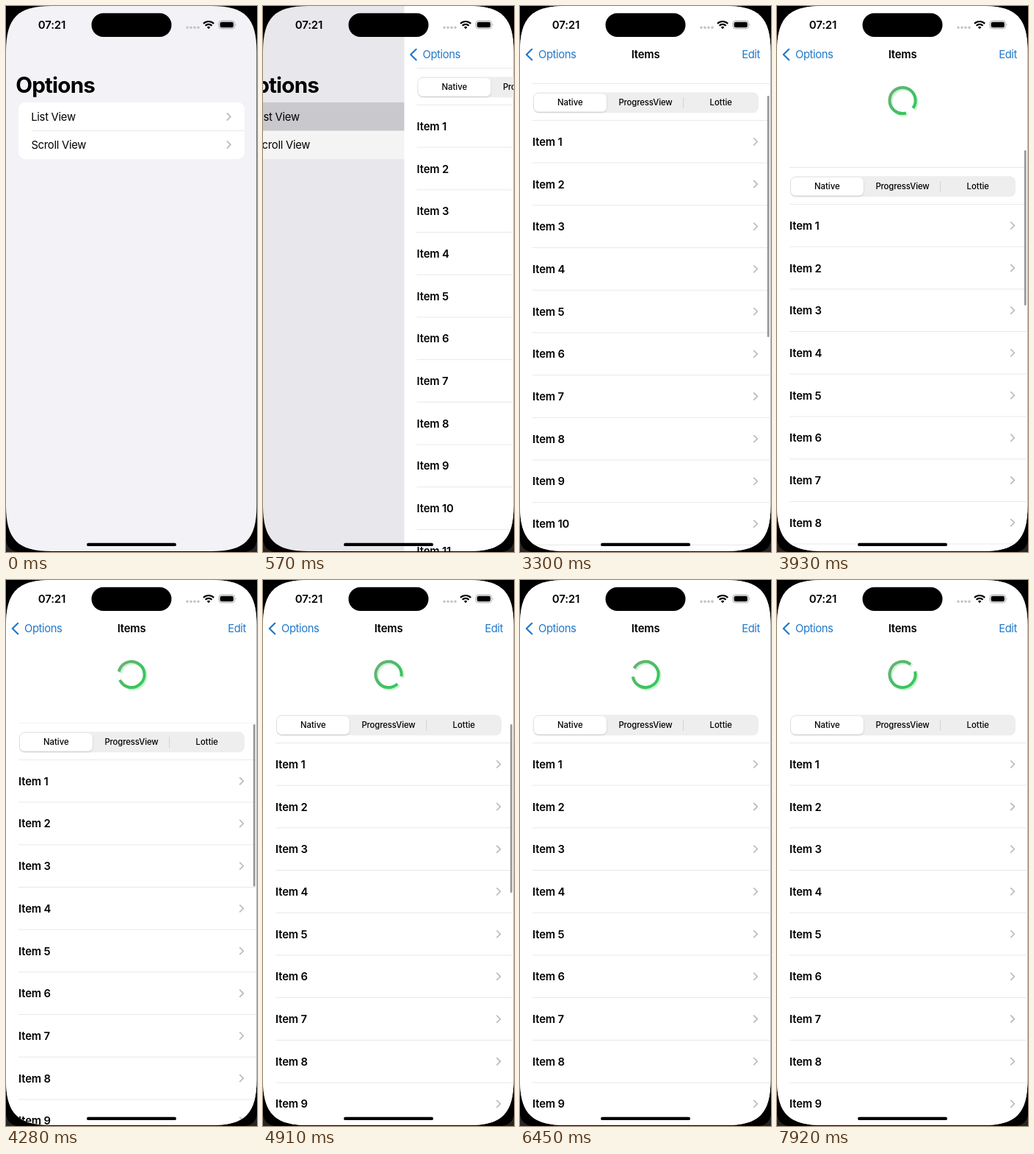
These frames come from a looping animation (342 by 742 pixels, 7.99 s). An HTML page:

```html
<!DOCTYPE html>
<html lang="en">
<head>
<meta charset="utf-8">
<title>Pull to refresh</title>
<style>
  html, body { margin: 0; width: 100%; height: 100%; overflow: hidden; background: #000; }
  svg { display: block; width: 100vw; height: 100vh; }
  text { font-family: Inter, "Liberation Sans", sans-serif; font-size: 14.8px; font-optical-sizing: none; }
  .semi { font-weight: 600; letter-spacing: -.17px; }
  .row { letter-spacing: -.27px; }
  .nav { fill: #2079c9; letter-spacing: -.4px; }
  .seg { font-size: 11.3px; font-weight: 500; text-anchor: middle; }
  .large { font-size: 29.6px; font-weight: 700; letter-spacing: -.8px; }
  .chev { fill: none; stroke: #bfbfc2; stroke-width: 1.8; stroke-linecap: round; stroke-linejoin: round; }
  .line { stroke: #e8e8e9; stroke-width: 1; }
</style>
</head>
<body>
<svg viewBox="0 0 342 742" xmlns="http://www.w3.org/2000/svg">
  <defs>
    <clipPath id="screen">
      <path d="M0 62C0 16 16 0 62 0H280C325.5 0 341.5 16 341.5 62V679C341.5 725 325.5 741 280 741H62C16 741 0 725 0 679Z"/>
    </clipPath>
    <linearGradient id="green" gradientUnits="userSpaceOnUse" x1="155" y1="114" x2="187" y2="143">
      <stop offset="0" stop-color="#6bb078"/>
      <stop offset=".65" stop-color="#3fc260"/>
      <stop offset="1" stop-color="#36c95b"/>
    </linearGradient>
    <filter id="soft" x="-20%" y="-20%" width="140%" height="140%"><feGaussianBlur stdDeviation=".7"/></filter>
    <filter id="lift" x="-10%" y="-20%" width="120%" height="150%">
      <feDropShadow dx="0" dy="1" stdDeviation="1.2" flood-opacity=".2"/>
    </filter>
  </defs>
  <rect width="342" height="742"/>
  <path d="M0 726Q2 740 16 742H0ZM342 726Q340 740 326 742H342Z" fill="#262626"/>
  <g clip-path="url(#screen)">
    <g id="home">
      <rect width="445" height="742" fill="#f2f2f7"/>
      <text class="large" x="13.2" y="117.5">Options</text>
      <rect x="17" y="131" width="308" height="77" rx="9" fill="#fff"/>
      <path id="tapped" d="M17 169.5V140a9 9 0 0 1 9-9H316a9 9 0 0 1 9 9V169.5Z" fill="#d1d1d6"/>
      <path class="line" d="M35 169.5H325"/>
      <text class="row" x="34.2" y="155.8">List View</text>
      <text class="row" x="34.4" y="193.8">Scroll View</text>
      <path class="chev" d="M301.5 146l4.5 4.5-4.5 4.5M301.5 184l4.5 4.5-4.5 4.5"/>
    </g>
    <rect id="dim" width="342" height="742"/>
    <g id="items">
      <rect width="342" height="742" fill="#fff"/>
      <g id="list">
        <path id="topLine" class="line" d="M17 84.5H342"/>
        <rect x="18" y="96.3" width="307" height="28" rx="7.8" fill="#eeeeef"/>
        <path d="M222.5 103V118" stroke="#d3d3d6"/>
        <rect x="19" y="98" width="98.7" height="24.6" rx="6.3" fill="#fff" filter="url(#lift)"/>
        <text class="seg" x="68.3" y="114.4">Native</text>
        <text class="seg" x="171" y="114.4" letter-spacing="-.1">ProgressView</text>
        <text class="seg" x="273.8" y="114.4">Lottie</text>
        <path class="line" d="M17 134.4H342"/>
      </g>
      <g id="spinner" fill="none" stroke-width="4">
        <path class="arc" stroke="#34d05c" stroke-opacity=".26" filter="url(#soft)"/>
        <path class="arc" stroke="url(#green)"/>
      </g>
      <rect id="bar" x="336.9" width="2.7" rx="1.35" fill="#98989a"/>
      <path d="M16.2 58.8L8.8 66l7.4 7.3" fill="none" stroke="#2079c9" stroke-width="2.2" stroke-linecap="round" stroke-linejoin="round"/>
      <text class="nav" x="25" y="71.2">Options</text>
      <text class="semi" x="171" y="71.2" text-anchor="middle">Items</text>
      <text class="nav" x="302.2" y="71.2">Edit</text>
    </g>
    <g id="status">
      <text class="semi" x="62.5" y="31" text-anchor="middle" style="font-size:15px">07:21</text>
      <rect x="116.5" y="9.7" width="109" height="32.2" rx="16.1"/>
      <path d="M247 29.3h.01m4.99 0h.01m4.99 0h.01m4.99 0h.01" stroke="#c3c3c6" stroke-width="3.6" stroke-linecap="round"/>
      <g fill="none" stroke="#000" stroke-width="2.2">
        <path d="M269 23.9a10.2 10.2 0 0 1 14.2 0M271.6 26.7a6.4 6.4 0 0 1 9 0"/>
        <path d="M276.1 31.2l-2.2-2.3a3.2 3.2 0 0 1 4.4 0Z" fill="#000" stroke="none"/>
      </g>
      <rect x="290" y="20.2" width="21.6" height="10.6" rx="3.5" fill="none" stroke="#a6a6a9"/>
      <rect x="291.6" y="21.7" width="18.4" height="7.6" rx="2.2"/>
      <path d="M312.8 23.8q1.6 1.7 0 3.4Z" fill="#a6a6a9"/>
      <rect x="110" y="729.7" width="122" height="4.4" rx="2.2"/>
    </g>
  </g>
</svg>
<script>
const LOOP = 7990, STEP = 70, PUSH = 500, PULL = 3300, RELEASE = 4140;
const REST = 87, PEAK = 135, PITCH = 57.7;
const $ = id => document.getElementById(id);
const clamp = x => Math.max(0, Math.min(1, x));
const ramp = (t, a, b) => clamp((t - a) / (b - a));
const spring = (ms, rate) => ms <= 0 ? 0 : 1 - (1 + rate * ms) * Math.exp(-rate * ms);
const shift = (id, x, y = 0) => $(id).setAttribute("transform", `translate(${x} ${y})`);
const fade = (id, value) => $(id).setAttribute("opacity", value);

let rows = "";
for (let i = 0; i < 11; i++) {
  const y = 163.3 + i * PITCH;
  rows += `<text class="semi" x="17.1" y="${y + 5.5}">Item ${i + 1}</text>
    <path class="chev" d="M318.8 ${y - 4.5}l4.6 4.5-4.6 4.5"/>
    <path class="line" d="M17 ${y + 28.8}H342"/>`;
}
$("list").insertAdjacentHTML("beforeend", rows);

function arcPath(gapAngle, shadow) {
  const point = deg => {
    const a = deg * Math.PI / 180;
    return `${171 + shadow + 17.6 * Math.cos(a)} ${128.4 + shadow + 17.6 * Math.sin(a)}`;
  };
  return `M${point(gapAngle + 19)}A17.6 17.6 0 1 1 ${point(gapAngle - 19)}`;
}

function pullOffset(t) {
  if (t < PULL) return 0;
  const drag = 1 - (1 - ramp(t, PULL, 3930)) ** 1.7;
  return 21 + (PEAK - 21) * drag - (PEAK - REST) * spring(t - RELEASE, .0125);
}

function draw(time) {
  // the screen refreshes in 70 ms steps
  const t = PUSH + Math.floor((time - PUSH + 1) / STEP) * STEP;

  const push = t >= 990 ? 1 : spring(t - PUSH + 40, .0135);
  shift("home", -103 * push);
  shift("items", 342 * (1 - push));
  fade("dim", .1 * push);
  fade("tapped", t >= PUSH ? 1 : 0);

  const off = pullOffset(t);
  shift("list", 0, off);
  fade("topLine", 1 - ramp(t, RELEASE, RELEASE + 280));

  const top = Math.min(196, 98.5 + 1.12 * off);
  $("bar").setAttribute("y", top);
  $("bar").setAttribute("height", 458 - .377 * off - top);
  fade("bar", t < PULL ? 0 : 1 - ramp(t, 5700, 6000));

  const angle = 55 + .339 * (t - 3930);
  document.querySelectorAll(".arc").forEach((arc, i) => arc.setAttribute("d", arcPath(angle, i ? 0 : 2)));
  fade("spinner", ramp(off, 40, REST));
}

const start = performance.now();
function tick() {
  draw((performance.now() - start) % LOOP);
  requestAnimationFrame(tick);
}
tick();
</script>
</body>
</html>
```
